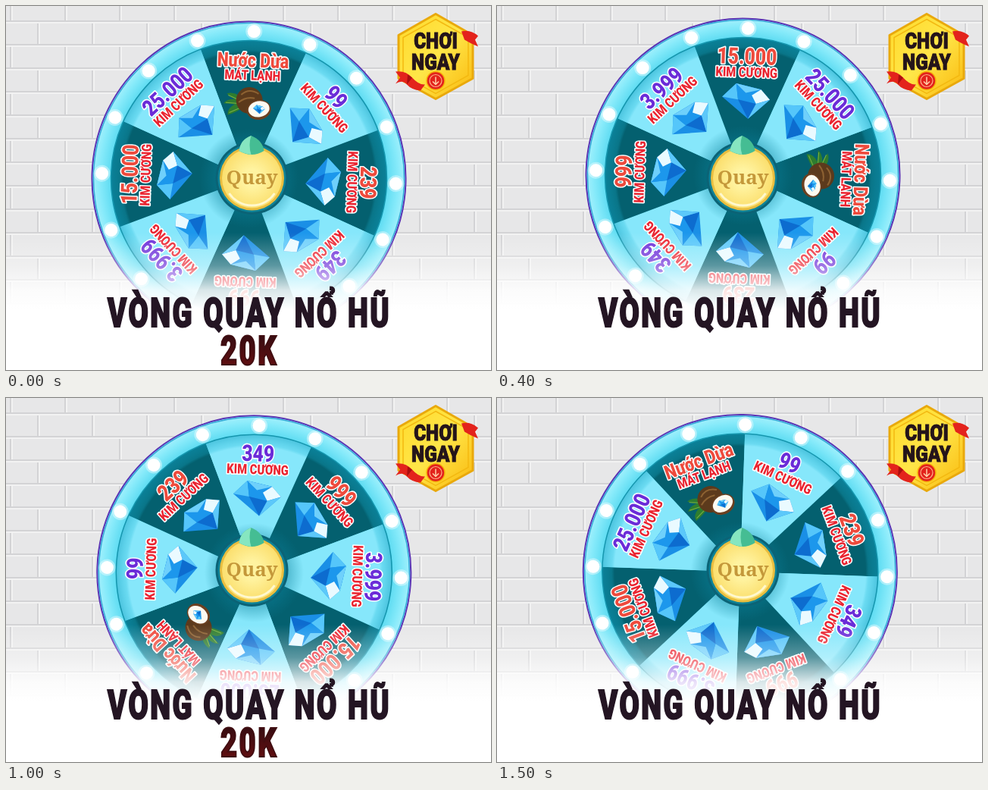
Write an HTML page that moves like this. It is 640 by 480 pixels and loops after 1.6 s.

```html
<!DOCTYPE html>
<html lang="vi">
<head>
<meta charset="utf-8">
<style>
  html, body { margin: 0; height: 100%; overflow: hidden; background: #fff; }
  svg { display: block; width: 640px; height: 480px; }
  text { font-family: Roboto, "Open Sans", sans-serif; font-weight: 900; text-anchor: middle; }
  .prize text { stroke: #fff; stroke-width: 3.5px; stroke-linejoin: round; paint-order: stroke; fill: #ea2430; }
  .headline { font-weight: 700; font-size: 53px; stroke-width: 2px; letter-spacing: 3.5px; }
  .badge-text { font-weight: 700; font-size: 29px; fill: #24141a; stroke: #24141a; stroke-width: 1px; }
</style>
</head>
<body>
<svg viewBox="0 0 640 480">
  <defs>
    <pattern id="bricks" width="72" height="62" patternUnits="userSpaceOnUse" patternTransform="translate(-14 -12)">
      <rect width="72" height="62" fill="#e7e7e8"/>
      <path d="M0 1H72M0 32H72M20 1V32M56 32V62" stroke="#d3d3d5" stroke-width="2" fill="none"/>
      <path d="M0 3H72M0 34H72M22 3V31M58 34V62" stroke="#f2f2f2" stroke-width="2" fill="none"/>
    </pattern>
    <linearGradient id="fade" x2="0" y2="1">
      <stop offset=".12" stop-color="#fff" stop-opacity="0"/>
      <stop offset=".5" stop-color="#fff" stop-opacity=".35"/>
      <stop offset=".78" stop-color="#fff" stop-opacity=".85"/>
      <stop offset="1" stop-color="#fff"/>
    </linearGradient>
    <radialGradient id="rim" gradientUnits="userSpaceOnUse" cx="0" cy="0" r="207">
      <stop offset=".88" stop-color="#5fdcf2"/>
      <stop offset=".95" stop-color="#86eafa"/>
      <stop offset="1" stop-color="#a5f1fc"/>
    </radialGradient>
    <radialGradient id="inset" gradientUnits="userSpaceOnUse" cx="0" cy="0" r="182">
      <stop offset=".22" stop-color="#0a7f98" stop-opacity=".5"/>
      <stop offset=".36" stop-color="#0a7f98" stop-opacity="0"/>
      <stop offset=".91" stop-color="#18b4d4" stop-opacity="0"/>
      <stop offset=".93" stop-color="#18b4d4" stop-opacity=".25"/>
      <stop offset="1" stop-color="#109fc0" stop-opacity=".5"/>
    </radialGradient>
    <radialGradient id="gold">
      <stop offset=".3" stop-color="#fff3a0"/>
      <stop offset="1" stop-color="#fbdf6e"/>
    </radialGradient>
    <linearGradient id="plate" x2="1" y2="1">
      <stop offset="0" stop-color="#ffd92a"/>
      <stop offset=".5" stop-color="#ffe648"/>
      <stop offset="1" stop-color="#f9b70c"/>
    </linearGradient>
    <linearGradient id="wine" x2="0" y2="1">
      <stop offset="0" stop-color="#2c0c12"/>
      <stop offset="1" stop-color="#6d0f10"/>
    </linearGradient>
    <g id="gem">
      <path d="M-31-3-13-21 20-14 32-1 4 25z" fill="#1a8fe6"/>
      <path d="M-31-3-13-21-10 0z" fill="#55c6fa"/>
      <path d="M-13-21 20-14 14 5-10 0z" fill="#1c97ec"/>
      <path d="M-13-21 20-14 0-9z" fill="#6fd0fb"/>
      <path d="M20-14 32-1 14 5 8-6z" fill="#eafaff"/>
      <path d="M-10 0 14 5 4 25z" fill="#0d6ccf"/>
      <path d="M14 5 32-1 4 25z" fill="#5cc8fa"/>
    </g>
    <g id="coconut">
      <path d="M-4 2Q-20-16-33-11Q-27-6-22-4Q-32-4-37 2Q-28 2-22 3Q-32 8-31 17Q-20 14-4 2z" fill="#2e7d2f"/>
      <path d="M-4 2-31-9M-4 2-34 1M-4 2-29 14" stroke="#7cb142" fill="none"/>
      <circle cx="-3" cy="-3" r="17.5" fill="#5c3a1c"/>
      <path d="M-14-10Q-4-20 9-12M-17 0Q-8-8 4-6" stroke="#8d6232" stroke-width="2" fill="none"/>
      <ellipse cx="10" cy="9" rx="16" ry="13" fill="#6b4020" transform="rotate(-12 10 9)"/>
      <ellipse cx="10" cy="8" rx="14" ry="10.5" fill="#fdfaf0" transform="rotate(-12 10 8)"/>
      <use href="#gem" transform="translate(10 8) scale(.25)"/>
    </g>
  </defs>

  <rect width="640" height="400" fill="url(#bricks)"/>

  <g id="wheel">
    <circle r="207" fill="url(#rim)" stroke="#5a34b4" stroke-width="2"/>
    <circle r="205" fill="none" stroke="#35a9d8" stroke-width="1.5"/>
    <g id="slices"></g>
    <circle r="182" fill="url(#inset)" stroke="#1596ae" stroke-width="1.5"/>
    <g id="bulbs" fill="#fff"></g>
    <g id="prizes"></g>
  </g>

  <g transform="translate(324.5 227)">
    <circle r="48" fill="#0b6376"/>
    <circle r="45" fill="#0e8398"/>
    <circle r="42.5" fill="#e9bd3f"/>
    <circle r="39.5" fill="url(#gold)"/>
    <path d="M-30 20A36 36 0 0 0 30 20" fill="none" stroke="#fff8cd" stroke-width="3"/>
    <path d="M-17-36Q-15-51-1-56Q14-50 16-36Q0-26-17-36z" fill="#45bd93"/>
    <path d="M-17-36Q-15-51-1-56Q-5-44-1-31Q-10-32-17-36z" fill="#86e6c0"/>
    <text y="8" font-size="26" fill="#c4983a" style="font-family:'Noto Serif',serif;font-weight:700">Quay</text>
  </g>

  <rect y="285" width="640" height="115" fill="url(#fade)"/>
  <rect y="399" width="640" height="81" fill="#fff"/>

  <g transform="translate(567 66.5)">
    <path d="M0-56 49-28V29L0 56-49 29V-28z" fill="url(#plate)" stroke="#e9a90c" stroke-width="3" stroke-linejoin="round"/>
    <path d="M0-49 43-25V25L0 49-43 25V-25z" fill="none" stroke="#f3b911" stroke-width="1.5"/>
    <path d="M34-33Q46-36 56-27L52-22 56-13Q46-17 38-22z" fill="#e3231c"/>
    <path d="M-53 20Q-40 18-31 28T-14 37L-20 45Q-32 44-38 37T-53 36L-47 28z" fill="#e3231c"/>
    <path d="M-37 24-31 28-38 37z" fill="#a90f10"/>
    <circle cy="32" r="12" fill="#e3231c" stroke="#f7b50c" stroke-width="1.5"/>
    <circle cy="32" r="8" fill="none" stroke="#ffb08a" stroke-width="1.2"/>
    <path d="M0 27V36M-4 33 0 37 4 33" fill="none" stroke="#ffd0a8" stroke-width="1.5"/>
    <g class="badge-text" transform="scale(.84 1)">
      <text y="-11">CHƠI</text>
      <text y="17">NGAY</text>
    </g>
  </g>

  <g class="headline" transform="translate(321 0) scale(.72 1)">
    <text y="423.500" fill="#241523" stroke="#241523">VÒNG QUAY NỔ HŨ</text>
    <text id="price" y="473.500" fill="url(#wine)" stroke="#3f0d11">20K</text>
  </g>
</svg>
<script>
  const $ = id => document.getElementById(id);
  const prizes = ['Nước Dừa', '99', '239', '349', '999', '3.999', '15.000', '25.000'];
  const wheel = $('wheel'), price = $('price');

  function slice(i) {
    const x = 182 * Math.sin(Math.PI / 8), y = -182 * Math.cos(Math.PI / 8);
    return `<path d="M0 0L${-x} ${y}A182 182 0 0 1 ${x} ${y}z" fill="${i % 2 ? '#86e7fb' : '#04606f'}" transform="rotate(${i * 45})"/>`;
  }

  function prize(name, i) {
    const drink = i === 0, color = i % 2 ? '#6a2cd8' : '#ee4a3c';
    return `<g class="prize" transform="rotate(${i * 45})">
      <g transform="scale(.82 1)">
        <text y="-147" font-size="${drink ? 26 : 30}" style="fill:${color}">${name}</text>
        <text y="-130" font-size="18">${drink ? 'MÁT LẠNH' : 'KIM CƯƠNG'}</text>
      </g>
      <use href="#${drink ? 'coconut' : 'gem'}" y="-100"/></g>`;
  }

  function bulb(i) {
    return `<g transform="rotate(${i * 22.5}) translate(0 -194)"><circle r="11" opacity=".4"/><circle r="8.5"/></g>`;
  }

  $('slices').innerHTML = prizes.map((_, i) => slice(i)).join('');
  $('prizes').innerHTML = prizes.map(prize).join('');
  $('bulbs').innerHTML = Array.from({ length: 16 }, (_, i) => bulb(i)).join('');

  // The wheel turns about a pivot slightly to the right of its own centre.
  function draw(now) {
    const step = Math.floor(now % 1600 / 100);
    wheel.setAttribute('transform', `translate(324.5 227.5) rotate(${step * 22.5}) translate(-4 0) rotate(2)`);
    price.setAttribute('visibility', step < 4 || (step > 7 && step < 13) ? 'visible' : 'hidden');
    requestAnimationFrame(draw);
  }
  draw(performance.now());
</script>
</body>
</html>
```
